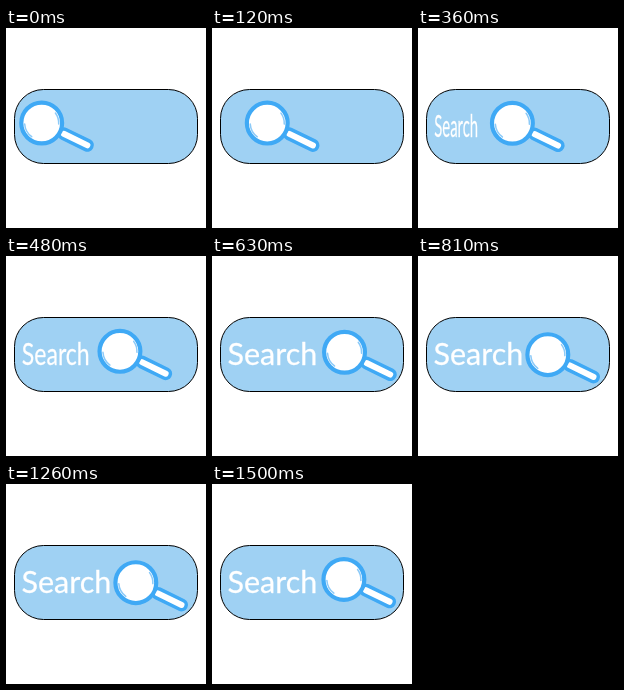
Animation, 200 px wide and 200 px high, one loop 2.13 s. Source, as an HTML page:

```html
<!DOCTYPE html>
<html lang="en">
<head>
<meta charset="utf-8">
<title>Search button</title>
<style>
  html, body { margin: 0; height: 100%; overflow: hidden; background: #fff; }
  svg { display: block; width: 100vw; height: 100vh; }
  text { font: 30.5px Lato, "Open Sans", sans-serif; fill: #fff; stroke: #fff; stroke-width: .3; }
</style>
</head>
<body>
<svg viewBox="0 0 200 200">
  <rect x="8.5" y="61.5" width="183" height="74" rx="29" fill="#9fd1f3" stroke="#000"/>
  <g id="label"><text x="-1.5" y="109">Search</text></g>
  <g id="glass" fill="none" stroke="#3fa9f5" stroke-linecap="round">
    <rect x="20" y="-4.75" width="35.5" height="9.5" rx="4.5" fill="#fff" stroke-width="3.5" transform="rotate(26)"/>
    <circle r="20.4" fill="#fff" stroke-width="4.2"/>
    <path d="M-17 1A17 17 0 0 0-10 13.7M17 1A17 17 0 0 0 13.7-10" stroke="#8ccaf8" stroke-width="1.5"/>
  </g>
</svg>
<script>
  const LOOP = 2130, STEP = 30;
  const ARRIVE = 590, TEXT_START = 140, ORBIT = 450, TURNS = 2;
  const START = { x: 35.7, y: 95 };
  const CENTER = { x: 130.8, y: 97 }, RADIUS = 1.9, REST_ANGLE = -0.96;
  const label = document.getElementById('label');
  const glass = document.getElementById('glass');

  const progress = (t, from, to) => Math.min(1, Math.max(0, (t - from) / (to - from)));
  const mix = (a, b, p) => a + (b - a) * p;

  function draw(now) {
    const t = Math.floor((now % LOOP) / STEP) * STEP;
    // Slide to the rest point, then circle clockwise back to it.
    const slide = progress(t, 0, ARRIVE);
    const turns = TURNS * progress(t, ARRIVE, ARRIVE + TURNS * ORBIT);
    const angle = REST_ANGLE + turns * 2 * Math.PI;
    const x = mix(START.x, CENTER.x + RADIUS * Math.cos(angle), slide);
    const y = mix(START.y, CENTER.y + RADIUS * Math.sin(angle), slide);
    glass.setAttribute('transform', `translate(${x} ${y})`);

    const scale = progress(t, TEXT_START, ARRIVE);
    label.setAttribute('visibility', scale ? 'visible' : 'hidden');
    label.setAttribute('transform', `translate(17 0) scale(${scale || 1} 1)`);
  }

  const origin = performance.now();
  (function tick() {
    draw(performance.now() - origin);
    requestAnimationFrame(tick);
  })();
</script>
</body>
</html>
```
